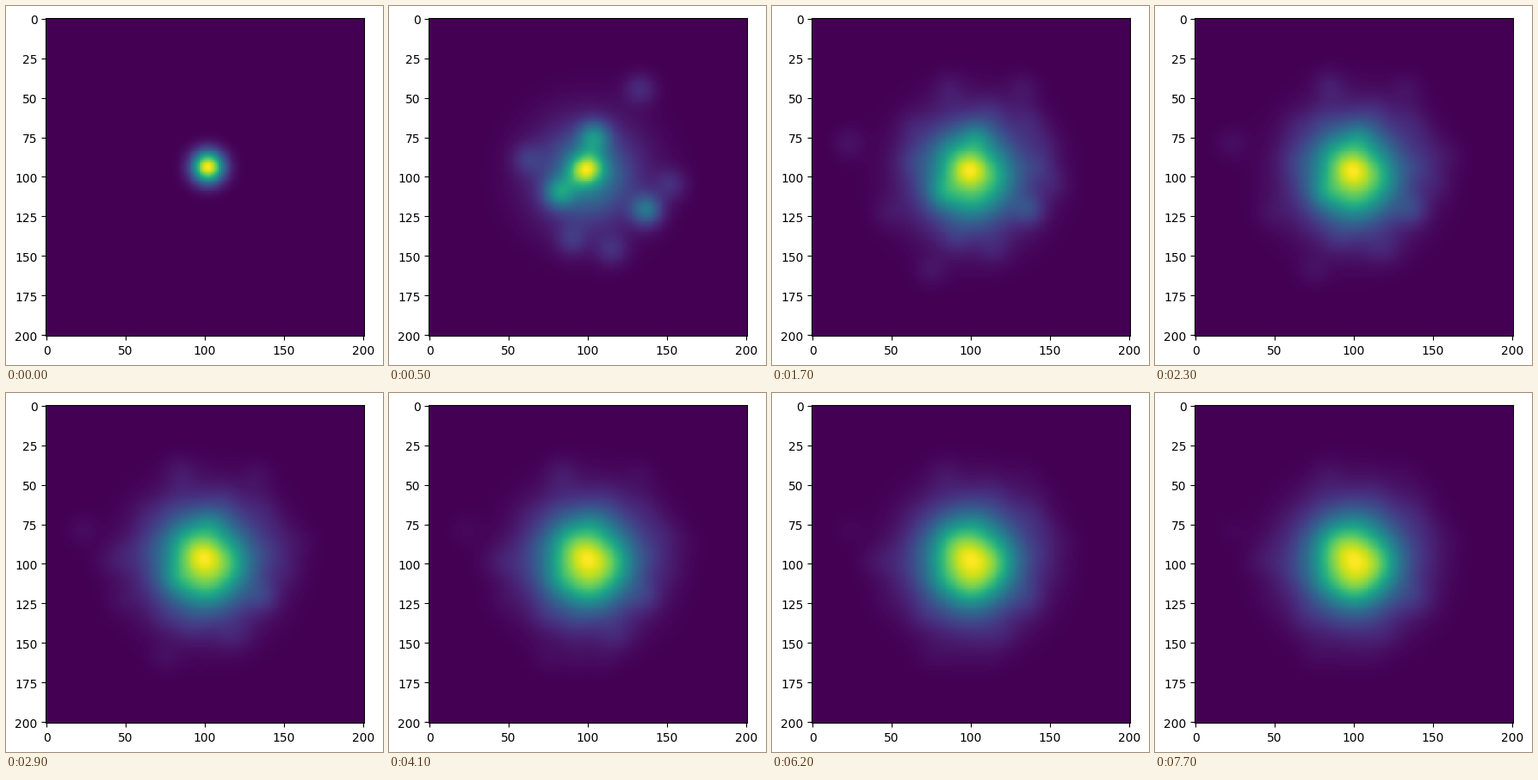
A matplotlib script that plays this animation: 438 px wide and 417 px high, repeating every 8 s.

```python
import numpy as np
import matplotlib.pyplot as plt
from matplotlib.animation import FuncAnimation
from matplotlib.transforms import ScaledTranslation

W, H, DPI = 438, 417, 100
LEFT, BOTTOM, SIDE = 46.2, 33.72, 369.6   # axes box in pixels
LABEL_DROP = 0.9                          # pixels
TICK_MS, TICKS, LAST_STEP = 100, 80, 25
SIZE = 201
GRID = np.arange(SIZE)

SPOT = 7              # width of a single deposit
CENTER = (100, 99)
CLOUD_WIDTH, CLOUD_RATE = 22.5, 3.0
ARM_WIDTH, ARM_RATE = 10, 0.45

START = (102, 94)
ARMS = [(90, 87), (114, 100), (100, 114)]
CLUMPS = [(96, 97), (104, 75), (82, 110), (137, 121)]
STRAYS = [(133, 45), (90, 140), (115, 146), (62, 89), (152, 105),
          (86, 45), (23, 79), (75, 159)]


def scatter(seed=4, per_step=2):
    """Faint late deposits around the rim, as (step, x, y)."""
    rng = np.random.default_rng(seed)
    for step in range(2, LAST_STEP + 1):
        for _ in range(per_step):
            angle, radius = rng.uniform(0, 2 * np.pi), rng.uniform(38, 62)
            yield (step, CENTER[0] + radius * np.cos(angle),
                   CENTER[1] + radius * np.sin(angle))


RIM = list(scatter())


def bump(point, width, weight):
    x, y = point
    across = np.exp(-((GRID - x) / width) ** 2 / 2)
    down = np.exp(-((GRID - y) / width) ** 2 / 2)
    return weight * np.outer(down, across)


def density(step):
    """Deposits pile up: a steady cloud plus single spots that stay."""
    field = bump(START, SPOT, 3)
    if step == 0:
        return field
    field += bump(CENTER, CLOUD_WIDTH, CLOUD_RATE * step)
    for arm in ARMS:
        field += bump(arm, ARM_WIDTH, ARM_RATE * step)
    for clump in CLUMPS:
        field += bump(clump, SPOT, 3)
    for i, stray in enumerate(STRAYS):
        if step >= 1 + i // 5:
            field += bump(stray, SPOT, 1)
    for birth, x, y in RIM:
        if step >= birth:
            field += bump((x, y), SPOT, 0.8)
    return field


def step_at(tick):
    """The first picture holds five ticks, each later one three."""
    return 0 if tick < 5 else 1 + (tick - 5) // 3


fig = plt.figure(figsize=(W / DPI + 1e-9, H / DPI + 1e-9), dpi=DPI,
                 facecolor="white")
ax = fig.add_axes([LEFT / W, BOTTOM / H, SIDE / W, SIDE / H])
image = ax.imshow(density(0), cmap="viridis", interpolation="nearest")
ax.set_xticks(range(0, SIZE, 50))
ax.set_yticks(range(0, SIZE, 25))

drop = ScaledTranslation(0, -LABEL_DROP / DPI, fig.dpi_scale_trans)
for label in ax.get_xticklabels() + ax.get_yticklabels():
    label.set_transform(label.get_transform() + drop)


def update(tick):
    field = density(step_at(tick))
    image.set_data(field)
    image.set_clim(field.min(), field.max())
    return [image]


anim = FuncAnimation(fig, update, frames=TICKS, interval=TICK_MS,
                     repeat=True, repeat_delay=0)
plt.show()
```
